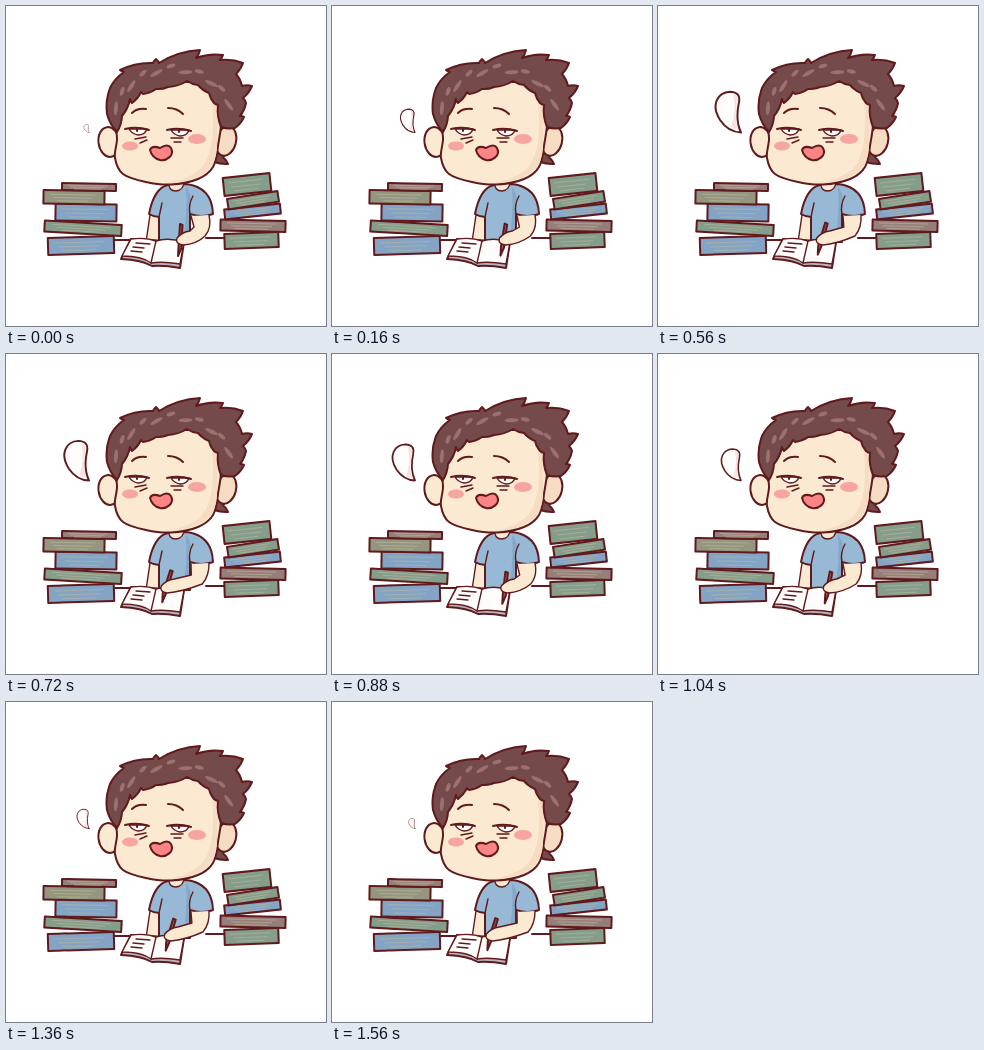
Write an HTML page that moves like this. It is 320 px wide and 320 px high and loops after 1.6 s.

```html
<!DOCTYPE html>
<html lang="en">
<head>
<meta charset="utf-8">
<title>Tired student</title>
<style>
  html, body { margin: 0; width: 100%; height: 100%; overflow: hidden; background: #fff; }
  svg { display: block; width: 100vw; height: 100vh; }
  .ink { stroke: #601a1d; stroke-width: 2; stroke-linejoin: round; stroke-linecap: round; }
  .thin { stroke-width: 1.4; }
  .line { fill: none; }
  .skin { fill: #fce9d2; }
  .shade { fill: #f5dcc2; }
  .hair { fill: #744a4b; }
  .gloss { fill: #9c7070; }
  .shirt { fill: #98b9d5; }
  .fold { fill: #85a8c8; }
  .white { fill: #fffdfb; }
  .blush { fill: #f7a5a0; }
  .mouth { fill: #fb8485; }
</style>
</head>
<body>
<svg viewBox="0 0 320 320">
  <path class="ink line" d="M108 234H128M200 232H218"/>
  <g id="books"></g>

  <g id="body">
    <path class="ink skin thin" d="M144 209L140 236H154V209Z"/>
    <path class="ink shirt" d="M162 179Q148 182 143 208Q148 211 153 211V236H184V208Q196 212 207 208Q206 181 180 178Z"/>
    <path class="fold" d="M180 181Q188 190 183 208V235H177Q182 205 180 181Z"/>
    <path class="ink line thin" d="M153 211L156 197M184 208Q182 199 187 190"/>
    <path class="ink skin thin" d="M163 176Q162 185 170 185Q178 184 178 175Z"/>
  </g>

  <g id="head">
    <path id="nape" class="ink hair"/>
    <ellipse class="ink skin" cx="103" cy="136" rx="10.500" ry="15" transform="rotate(-8 103 136)"/>
    <ellipse class="ink shade" cx="220" cy="135" rx="10" ry="15" transform="rotate(14 220 135)"/>
    <path id="face" class="ink skin"/>
    <path class="shade" d="M206 96Q211 150 192 165Q180 174 160 177Q212 176 211 138L212 98Z"/>
    <path id="hair" class="ink hair"/>
    <g id="gloss" class="gloss"></g>

    <path class="ink line" d="M126 107Q131 102 140 103M162 102Q171 102 177 108"/>
    <g id="eye">
      <path class="ink white thin" d="M123 123H141Q139 129 132 129Q126 128 123 123"/>
      <path class="ink line" d="M119 123Q131 120 143 124M131 123V125"/>
    </g>
    <use href="#eye" x="42" y="1"/>
    <path class="ink line thin" d="M129 133L140 131M134 137L141 134M165 132H177M168 136H175"/>
    <ellipse class="blush" cx="124" cy="140" rx="8" ry="4.500"/>
    <ellipse class="blush" cx="191" cy="133" rx="9" ry="5"/>
    <path class="ink mouth" d="M144 144Q146 139 154 142Q162 137 165 142C169 150 160 155 154 154Q146 152 144 144Z"/>
  </g>

  <g id="notebook">
    <path class="ink" fill="#b9b4bd" d="M125 233L115 253Q136 254 146 260Q158 259 174 262L178 236Z"/>
    <path class="ink white thin" d="M125 233Q140 231 150 235Q162 231 178 236L174 258Q156 255 145 257Q136 250 116 250Z"/>
    <path class="ink line thin" d="M150 235L145 257M130 237L144 238M127 241L138 242M125 245L136 246"/>
  </g>

  <path id="pen" class="ink" fill="#a1615c" stroke-width="1.300"/>
  <path id="arm" class="ink skin thin"/>

  <g id="bubble">
    <path class="ink white" d="M83 126.500Q70 126 62 114C52 98 60 86 72 85.500Q83 86 81 96Q77 114 83 126.500Z"/>
    <path fill="#f3e3e1" d="M75 88Q81 88 79 97Q76 112 80 124L73 121Q79 105 75 88Z"/>
  </g>
</svg>
<script>
const LOOP = 1600, TICK = 40, PEAK = 600, STROKE = 800;
const $ = id => document.getElementById(id);
const setPath = (id, d) => $(id).setAttribute('d', d);
const points = text => text.split(' ').map(p => p.split(',').map(Number));

// Smooth closed curve through the points.
function blob(text) {
  const p = points(text), n = p.length;
  const at = i => p[(i + n) % n];
  return `M${p[0]}` + p.map((a, i) => {
    const [before, b, after] = [at(i - 1), at(i + 1), at(i + 2)];
    const c1 = a.map((v, k) => v + (b[k] - before[k]) / 6);
    const c2 = b.map((v, k) => v - (after[k] - a[k]) / 6);
    return `C${c1} ${c2} ${b}`;
  }).join('') + 'Z';
}

// Closed outline with a bulging lock between each pair of tips.
function locks(text, bulge) {
  const p = points(text);
  return `M${p[0]}` + p.map(([x, y], i) => {
    const [u, v] = p[(i + 1) % p.length];
    return `Q${(x + u) / 2 + (v - y) * bulge} ${(y + v) / 2 - (u - x) * bulge} ${u} ${v}`;
  }).join('') + 'Z';
}

// Piles a book on the last one: centre, width, height, tilt, colour.
function stack(base, list) {
  let y = base, lean = list[0][3];
  return list.map(([x, w, h, tilt, fill]) => {
    y -= Math.abs(tilt - lean) / 2 + h;
    lean = tilt;
    const left = x - w / 2;
    const grain = [.3, .55, .78].map((v, i) =>
      `M${left + w * (.1 + i * .06)} ${y + h * v}h${w * (.75 - i * .12)}`).join('');
    return `<g transform="rotate(${Math.atan2(tilt, w) * 180 / Math.PI} ${x} ${y + h / 2})">
      <rect class="ink" x="${left}" y="${y}" width="${w}" height="${h}" fill="${fill}"/>
      <path d="${grain}" stroke="#bdb99e" stroke-opacity=".6"/></g>`;
  }).join('');
}

const BLUE = '#83a4c5', GREEN = '#859d8b', OLIVE = '#959680', BROWN = '#967f7a';
$('books').innerHTML =
  stack(248, [[75, 66, 17, -2, BLUE], [77, 77, 11, 4.5, GREEN], [80, 61, 17, 1, BLUE],
    [68, 61, 13.5, 1, OLIVE], [83, 54, 7, 1, BROWN]]) +
  stack(242, [[245.5, 54, 15, -2, GREEN], [247, 65, 11, 1.5, BROWN], [246.5, 56, 10, -6, BLUE],
    [247, 51, 10.5, -8, GREEN], [241, 47, 18, -5, GREEN]]);

setPath('face', blob('112,112 111,134 109,152 117,168 140,176 165,178.5 192,173 207,161 212,140 214,105 190,76 135,82'));
setPath('nape', locks('207,146 222,140 219,149 217,151 222,158 208,156', .1));
setPath('hair', locks('111,126 101,108 104,82 118,66 114,64 147,57 150,53 153,57 194,44 190,52 217,49 214,54 ' +
  '237,57 230,68 236,80 246,80 237,92 240,97 234,110 238,111 229,122 215,121 212,99 208,97 203,87 192,79 ' +
  '181,75 162,81 150,83 137,88 135,86 126,97 124,93 116,110', .13));

// Shine follows the crown.
$('gloss').innerHTML = Array.from({ length: 11 }, (_, i) => {
  const a = (162 - i * 14) * Math.PI / 180;
  const x = 167 + 60 * Math.cos(a), y = 119 - 54 * Math.sin(a) - i % 2 * 5;
  const turn = 90 - a * 180 / Math.PI - 14;
  return `<ellipse cx="${x}" cy="${y}" rx="${i % 2 ? 4.5 : 7}" ry="2" transform="rotate(${turn} ${x} ${y})"/>`;
}).join('');

function bubbleScale(t) {
  return t < PEAK
    ? 1 - .8 * (1 - t / PEAK) ** 2
    : 1 - .8 * ((t - PEAK) / (LOOP - PEAK)) ** 1.5;
}

function draw(t) {
  $('bubble').setAttribute('transform',
    `translate(83 126.5) scale(${bubbleScale(t)}) translate(-83 -126.5)`);

  // The hand crosses the page, then jumps back.
  const p = t % STROKE / STROKE;
  const tip = 172 - 17.5 * p, top = tip + 3 + 6 * (1 - (1 - p) ** 2);
  const low = 250 - 2 * p, elbow = 201 - 3 * p;
  setPath('pen', `M${tip} ${low}L${tip + .5} ${low - 9}L${top - 1} ${low - 32}L${top + 1.5} ${low - 31}L${tip + 3.5} ${low - 8}Z`);
  setPath('arm', `M203 209Q${elbow + 5} 222 ${elbow - 2} 230Q${tip + 19} 238 ${tip + 5} 239` +
    `Q${tip - 3} 238 ${tip - 1} 232Q${tip + 4} 226 ${tip + 12} 225L${elbow - 13} 221L185 210`);
}

const start = performance.now();
function loop() {
  const t = (performance.now() - start) % LOOP;
  draw(Math.floor(t / TICK) * TICK);
  requestAnimationFrame(loop);
}
loop();
</script>
</body>
</html>
```
